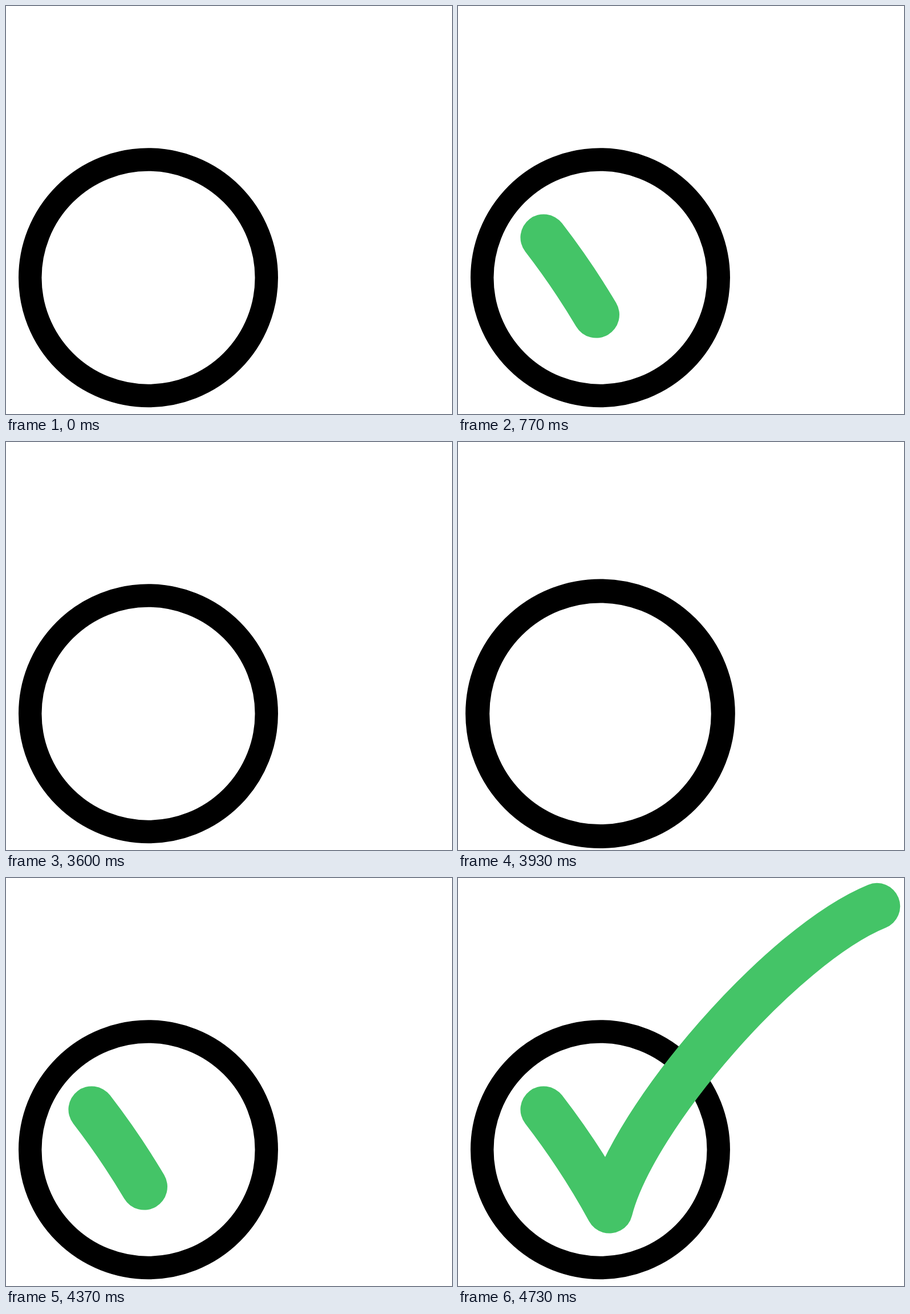
These frames come from a looping animation (782 by 716 pixels, 7.21 s). An HTML page:

```html
<!DOCTYPE html>
<html lang="en">
<head>
<meta charset="utf-8">
<title>Check mark</title>
<style>
  html, body { margin: 0; width: 100%; height: 100%; overflow: hidden; background: #fff; }
  svg { display: block; width: 782px; height: 716px; }
</style>
</head>
<body>
<svg viewBox="0 0 782 716" fill="none">
  <circle id="ring" r="207.25" stroke="#000" stroke-width="40.5"/>
  <path id="tick" pathLength="1" stroke="#44c467" stroke-width="81.5"
    stroke-linecap="round" stroke-linejoin="round"
    d="M150.2 406.2Q215.8 491.4 265.5 582.8C307.2 418.2 568.9 117.4 734.5 49.6"/>
</svg>
<script>
const LOOP = 7210, HALF = 3600, STEP = 100 / 3;
const PULSE_PEAK = 8, PULSE_END = 20, TICK_START = 21, TICK_STEPS = 13.8, TICK_END = 34;
const ring = document.getElementById('ring');
const tick = document.getElementById('tick');

// cubic-bezier(.25, .1, .25, 1), solved by bisection
function ease(x) {
  if (x <= 0) return 0;
  if (x >= 1) return 1;
  let lo = 0, hi = 1, s = 0.5;
  for (let i = 0; i < 24; i++) {
    s = (lo + hi) / 2;
    if (0.75 * s * (1 - s) + s ** 3 < x) lo = s; else hi = s;
  }
  return 0.3 * s * (1 - s) ** 2 + 3 * s * s * (1 - s) + s ** 3;
}

function draw(time) {
  const t = time % LOOP;
  // The picture advances in steps of 1/30 s
  const step = Math.floor((t < HALF ? t : t - HALF) / STEP + 0.102);

  const pulse = step < PULSE_PEAK
    ? ease(step / PULSE_PEAK)
    : 1 - ease((step - PULSE_PEAK) / (PULSE_END - PULSE_PEAK));
  ring.setAttribute('transform', `translate(249.5 476.75) scale(${1 + 0.05 * pulse})`);

  const drawn = step >= TICK_END ? 1 : ease((step - TICK_START) / TICK_STEPS);
  tick.style.visibility = step < TICK_START ? 'hidden' : 'visible';
  tick.setAttribute('stroke-dasharray', `${Math.max(drawn, 0.0005)} 2`);
}

const start = performance.now();
function animate() {
  draw(performance.now() - start);
  requestAnimationFrame(animate);
}
animate();
</script>
</body>
</html>
```
